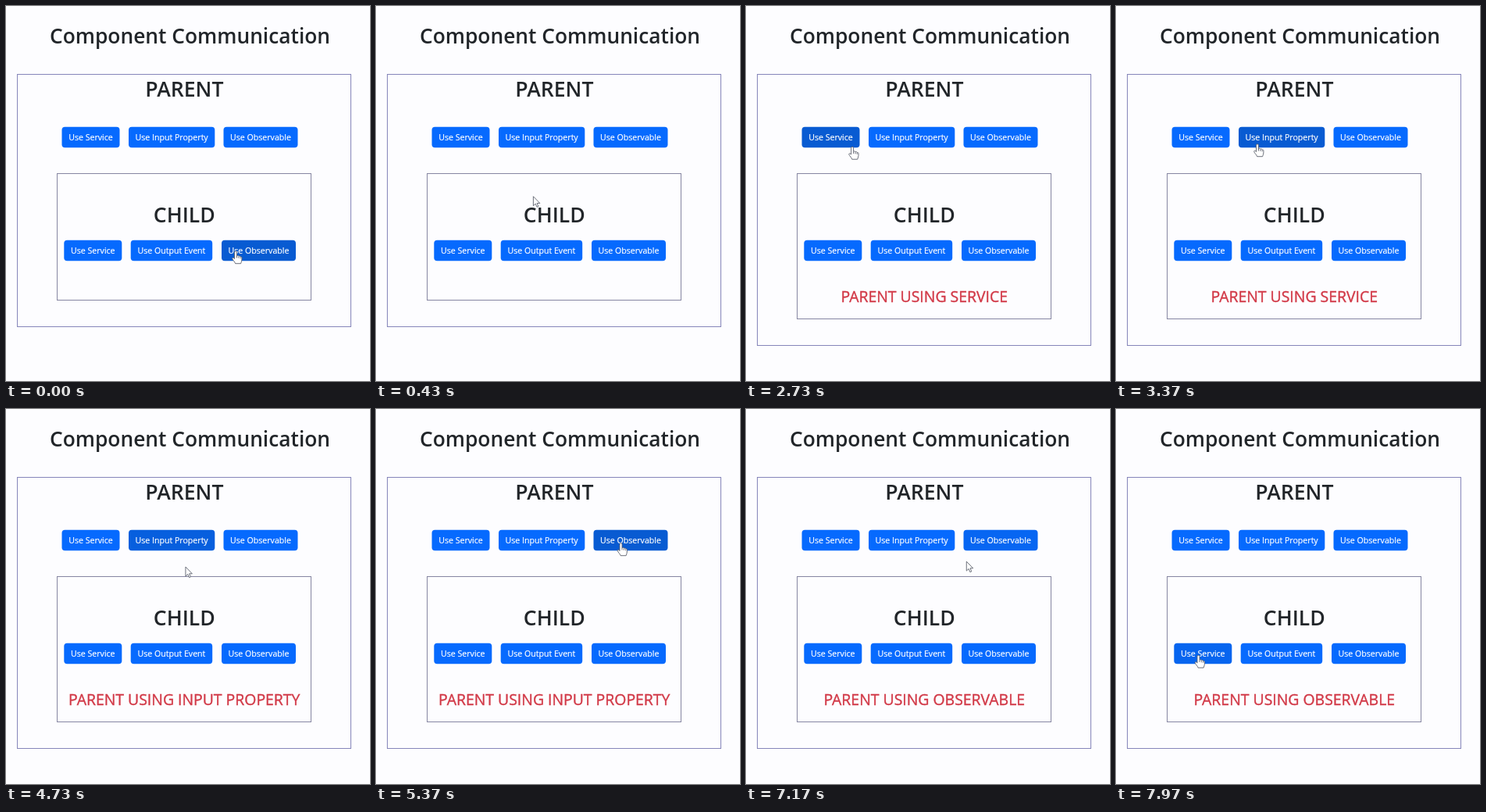
An HTML page for the animation above (8000 ms loop, 466 by 480 pixels).

```html
<!DOCTYPE html>
<html lang="en">
<head>
<meta charset="utf-8">
<title>Component Communication</title>
<style>
  html, body { margin: 0; width: 100%; height: 100%; overflow: hidden; background: #fdfdff; }
  svg { display: block; width: 466px; height: 480px; }
  text { font-family: "Open Sans", "Noto Sans", sans-serif; text-anchor: middle; fill: #212529; }
  .title { font-size: 26.35px; font-weight: 600; }
  .heading { font-size: 26.6px; font-weight: 600; }
  .label { font-size: 10.6px; fill: #fff; stroke: #fff; stroke-width: .2; }
  .message { font-size: 19.4px; fill: #d23a48; stroke: #d23a48; stroke-width: .4; }
  .box { fill: none; stroke-width: 1; }
  .cursor path { fill: #fff; stroke: #5c606c; stroke-width: .9; stroke-linejoin: round; }
</style>
</head>
<body>
<svg id="stage" viewBox="0 0 466 480">
  <rect width="466" height="480" fill="#fdfdff"/>
  <text class="title" x="235.5" y="47.5">Component Communication</text>
  <rect id="parentBox" class="box" x="14.5" y="87.5" width="427" height="323" stroke="#8686ba"/>
  <text class="heading" x="228.3" y="115.5">PARENT</text>
  <rect id="childBox" class="box" x="65.5" y="214.5" width="325" height="162" stroke="#8686a2"/>
  <text class="heading" x="228.3" y="277">CHILD</text>
  <g id="buttons"></g>
  <text id="message" class="message" x="228.2" y="379"></text>
  <g id="hand" class="cursor">
    <path d="M-1.5 1.2a1.5 1.5 0 0 1 3 0V6c.5-1 2.2-.8 2.4.4 .7-.8 2.1-.4 2.2.7 .8-.5 1.8 0 1.8 1.2V11c0 2-1 3-1.3 4.7H-.4C-.8 13.8-3.6 11.3-4.2 9.7c-.5-1.4.9-2 1.8-1.1l.9 1z"/>
    <path d="M1.5 6v2.5M3.9 6.8v2M6.1 7.5v1.7" stroke-width=".7"/>
  </g>
  <g id="arrow" class="cursor">
    <path d="M0 0V12L2.8 9.4 4.6 13.6 6.5 12.8 4.7 8.7H8.4z"/>
  </g>
</svg>
<script>
const LOOP = 8000;
const FADE = 150;
const FADE_SAMPLES = 15;
const NORMAL = [6, 106, 254];
const HOVER = [8, 91, 210];

// label, x, y, width
const buttons = [
  ["Use Service", 71.5, 154.7, 74],
  ["Use Input Property", 157, 154.7, 110.3],
  ["Use Observable", 278.5, 154.7, 95],
  ["Use Service", 74.3, 299.7, 74],
  ["Use Output Event", 159.7, 299.7, 104.5],
  ["Use Observable", 276, 299.7, 95],
].map(([label, x, y, w]) => ({ label, x, y, w, h: 26.6 }));

// time, x, y of the pointer tip
const path = [
  [0, 294, 314], [30, 294, 314], [830, 109.5, 174],
  [2500, 109.5, 174], [2730, 136, 180.5], [3200, 181, 177],
  [4430, 181, 177], [4690, 222, 181], [4730, 229.7, 202], [4900, 270, 199], [5230, 313.5, 172],
  [6900, 313.5, 172], [7700, 152, 287], [7920, 115, 298], [7960, 105.5, 315.5], [8000, 105.5, 315.5],
];

const messages = [
  [1800, "PARENT USING SERVICE"],
  [3840, "PARENT USING INPUT PROPERTY"],
  [5840, "PARENT USING OBSERVABLE"],
];

const byId = id => document.getElementById(id);

function add(parent, tag, attrs, content = "") {
  const node = document.createElementNS("http://www.w3.org/2000/svg", tag);
  for (const name in attrs) node.setAttribute(name, attrs[name]);
  node.textContent = content;
  return parent.appendChild(node);
}

for (const b of buttons) {
  b.rect = add(byId("buttons"), "rect", { x: b.x, y: b.y, width: b.w, height: b.h, rx: 4 });
  add(byId("buttons"), "text", { class: "label", x: b.x + b.w / 2, y: b.y + 17.3 }, b.label);
}

const still = (a, b) => !a || !b || (a[1] === b[1] && a[2] === b[2]);

// Speed along one axis, zero where the pointer rests
function speed(i, axis) {
  const before = path[i - 1], here = path[i], after = path[i + 1];
  if (still(before, here) || still(here, after)) return 0;
  return (after[axis] - before[axis]) / (after[0] - before[0]);
}

function pointerAt(t) {
  let i = 0;
  while (i < path.length - 2 && t >= path[i + 1][0]) i++;
  const a = path[i], b = path[i + 1], span = b[0] - a[0];
  const u = (t - a[0]) / span, v = 1 - u;
  const along = axis =>
    v * v * (1 + 2 * u) * a[axis] + u * u * (3 - 2 * u) * b[axis] +
    span * u * v * (v * speed(i, axis) - u * speed(i + 1, axis));
  return { x: along(1), y: along(2) };
}

const inside = (p, b) => p.x >= b.x && p.x <= b.x + b.w && p.y >= b.y && p.y <= b.y + b.h;

function render(t) {
  const recent = Array.from({ length: FADE_SAMPLES }, (_, k) =>
    pointerAt(Math.max(0, t - k * FADE / FADE_SAMPLES)));
  const pointer = recent[0];

  for (const b of buttons) {
    const amount = recent.filter(p => inside(p, b)).length / FADE_SAMPLES;
    const color = NORMAL.map((c, k) => Math.round(c + (HOVER[k] - c) * amount));
    b.rect.setAttribute("fill", `rgb(${color})`);
  }

  const shown = messages.filter(m => t >= m[0]).pop();
  const grow = shown ? 24 : 0;
  byId("message").textContent = shown ? shown[1] : "";
  byId("parentBox").setAttribute("height", 323 + grow);
  byId("childBox").setAttribute("height", 162 + grow);

  const pointing = buttons.some(b => inside(pointer, b));
  for (const [id, visible] of [["hand", pointing], ["arrow", !pointing]]) {
    byId(id).setAttribute("transform", `translate(${pointer.x} ${pointer.y})`);
    byId(id).setAttribute("visibility", visible ? "visible" : "hidden");
  }
}

const start = performance.now();
function tick() {
  render((performance.now() - start) % LOOP);
  requestAnimationFrame(tick);
}
tick();
</script>
</body>
</html>
```
